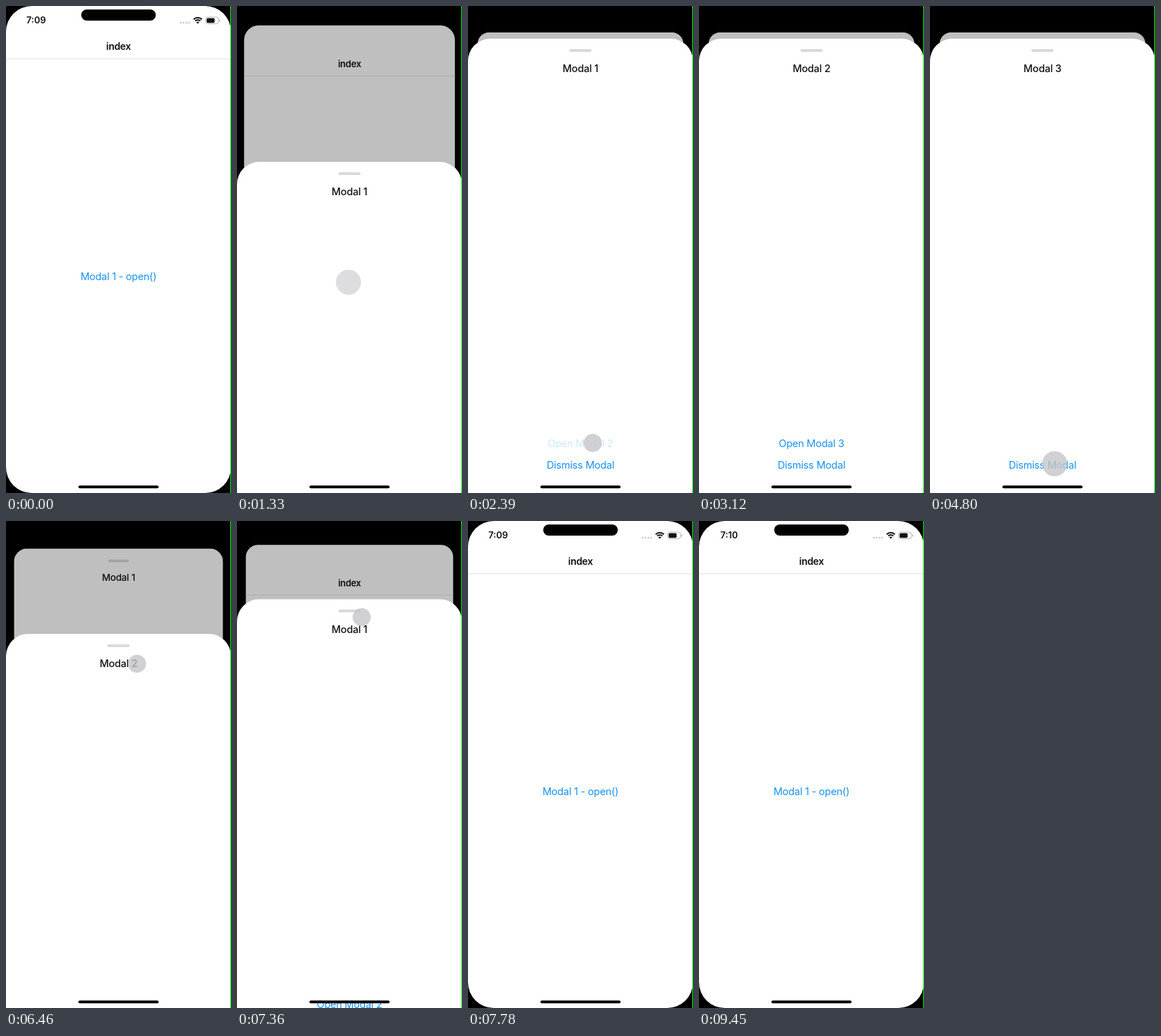
These frames come from a looping animation (323 px wide and 700 px high, 9610 ms). An HTML page with a canvas:

```html
<!DOCTYPE html>
<html lang="en">
<head>
<meta charset="utf-8">
<title>Stacked modals</title>
<style>
  html, body { margin: 0; width: 100%; height: 100%; overflow: hidden; background: #000; }
  canvas { display: block; width: 323px; height: 700px; }
</style>
</head>
<body>
<canvas id="stage"></canvas>
<script>
const W = 323, H = 700, LOOP = 9610, REST = 47, MID = 161.5;
const BLUE = '#1890f0';
const canvas = document.getElementById('stage');
const ctx = canvas.getContext('2d');
const ratio = window.devicePixelRatio || 1;
canvas.width = Math.round(W * ratio);
canvas.height = Math.round(H * ratio);

const clamp = x => Math.min(1, Math.max(0, x));
const lerp = (a, b, k) => a + (b - a) * k;
const phase = (t, start, length) => clamp((t - start) / length);

// Critically damped spring, normalised so that it ends at 1.
const settle = x => 1 - (1 + 6.5 * x) * Math.exp(-6.5 * x);
const spring = x => settle(x) / settle(1);

const sheets = [
  { open: 1120, drag: { start: 7150, length: 280, distance: 115 }, close: 7430, fall: 350 },
  { open: 2560, drag: { start: 5930, length: 600, distance: 147 }, close: 6530, fall: 350 },
  { open: 3860, close: 4870, fall: 600 }
];

const touches = [
  { x: 160, y: 397, down: 570, up: 950, fade: 680, link: 'Modal 1 - open()' },
  { x: 179, y: 628, down: 2050, up: 2390, fade: 680, link: 'Open Modal 2' },
  { x: 179, y: 628, down: 3320, up: 3690, fade: 680, link: 'Open Modal 3' },
  { x: 179, y: 658, down: 4630, up: 4700, fade: 680, link: 'Dismiss Modal' },
  { x: 188, y: 90, down: 5730, up: 6530, fade: 340, sheet: sheets[1] },
  { x: 179, y: 73, down: 7080, up: 7430, fade: 340, sheet: sheets[0] }
];

function dragOffset(sheet, t) {
  if (!sheet.drag) return 0;
  const { start, length, distance } = sheet.drag;
  return distance * phase(t, start, length) ** 2;
}

function sheetTop(sheet, t) {
  const opened = lerp(H, REST, spring(phase(t, sheet.open, 540)));
  return lerp(opened + dragOffset(sheet, t), H, spring(phase(t, sheet.close, sheet.fall)));
}

function linkAlpha(label, t) {
  const touch = touches.find(p => p.link === label && t >= p.down && t < p.up + 100);
  if (!touch) return 1;
  return 1 - 0.8 * phase(t, touch.down, 150) * (1 - phase(t, touch.up, 100));
}

function pill(x, y, w, h, color, radius = h / 2) {
  ctx.fillStyle = color;
  ctx.beginPath();
  ctx.roundRect(x, y, w, h, radius);
  ctx.fill();
}

function text(label, x, y, size, weight, color, spacing = '-0.2px') {
  ctx.font = `${weight} ${size}px Inter, sans-serif`;
  ctx.letterSpacing = spacing;
  ctx.textAlign = 'center';
  ctx.textBaseline = 'alphabetic';
  ctx.fillStyle = color;
  ctx.fillText(label, x, y + size * 0.36);
}

function link(label, y, t) {
  ctx.globalAlpha = linkAlpha(label, t);
  text(label, MID, y, 14.5, 400, BLUE);
  ctx.globalAlpha = 1;
}

function indexContent(t) {
  text('index', MID, 57.5, 14, 600, '#111', '-0.3px');
  ctx.fillStyle = '#e2e2e2';
  ctx.fillRect(0, 75.5, W, 1);
  link('Modal 1 - open()', 388.5, t);
}

function modalContent(number, t) {
  pill(145.5, 15, 32, 4, '#d9d9d9');
  text('Modal ' + number, MID, 43, 14.5, 500, '#111');
  if (number < 3) link('Open Modal ' + (number + 1), 582, t);
  link('Dismiss Modal', 613, t);
}

// covered: how far the next sheet is up; buried: the one after that.
function drawCard(level, top, covered, buried, t) {
  const scale = 1 - 0.086 * covered - 0.05 * buried;
  const y = lerp(top, 38, covered) + 5 * buried;
  const radius = lerp(level ? 32 : 37, 18, covered);
  const corners = level ? [radius, radius, 0, 0] : radius;
  ctx.save();
  ctx.translate(MID, y);
  ctx.scale(scale, scale);
  ctx.translate(-MID, 0);
  ctx.beginPath();
  ctx.roundRect(0, 0, W, level ? H + 20 : H, corners);
  ctx.clip();
  ctx.fillStyle = '#fff';
  ctx.fillRect(0, 0, W, H + 20);
  ctx.translate(0, 2.5 * covered);
  if (level) modalContent(level, t);
  else indexContent(t);
  ctx.translate(0, -2.5 * covered);
  const shade = 0.25 * clamp(covered / 0.73);
  ctx.fillStyle = `rgba(0,0,0,${lerp(shade, 1, buried)})`;
  ctx.fillRect(0, 0, W, H + 20);
  ctx.restore();
}

function statusBar(t, alpha) {
  ctx.globalAlpha = alpha;
  text(t < 9450 ? '7:09' : '7:10', 43.3, 20.8, 13, 600, '#111', '0px');
  for (let i = 0; i < 4; i++) pill(249.5 + i * 4, 22.8, 2.6, 2.6, '#c8c8c8');

  ctx.strokeStyle = '#111';
  ctx.lineWidth = 1.9;
  for (const r of [8.4, 5.2]) {
    ctx.beginPath();
    ctx.arc(275.3, 25.2, r, -Math.PI * 0.75, -Math.PI * 0.25);
    ctx.stroke();
  }
  ctx.fillStyle = '#111';
  ctx.beginPath();
  ctx.moveTo(275.3, 25.6);
  ctx.arc(275.3, 25.6, 3, -Math.PI * 0.75, -Math.PI * 0.25);
  ctx.fill();

  ctx.strokeStyle = '#b4b4b4';
  ctx.lineWidth = 1;
  ctx.beginPath();
  ctx.roundRect(286.5, 16, 18.5, 9.6, 3);
  ctx.stroke();
  pill(288, 17.4, 11.5, 6.8, '#111', 1.6);
  pill(306, 19.2, 1.3, 3.2, '#b4b4b4', 0.6);
  ctx.globalAlpha = 1;
}

function drawTouch(touch, t) {
  if (t < touch.down || t > touch.up + touch.fade) return;
  const appear = phase(t, touch.down, 120);
  const gone = phase(t, touch.up + touch.fade * 0.4, touch.fade * 0.6);
  const radius = 13 * lerp(0.6, 1, appear) + 5 * phase(t, touch.up, 100);
  const drag = touch.sheet ? dragOffset(touch.sheet, t) : 0;
  ctx.fillStyle = `rgba(197,197,200,${0.79 * appear * (1 - gone)})`;
  ctx.beginPath();
  ctx.arc(touch.x, touch.y + drag, radius, 0, Math.PI * 2);
  ctx.fill();
}

function draw(t) {
  ctx.setTransform(canvas.width / W, 0, 0, canvas.height / H, 0, 0);
  ctx.fillStyle = '#000';
  ctx.fillRect(0, 0, W, H);

  const tops = [0, ...sheets.map(sheet => sheetTop(sheet, t))];
  const raised = i => i < tops.length ? (H - tops[i]) / (H - REST) : 0;
  tops.forEach((top, i) => {
    if (top < H) drawCard(i, top, raised(i + 1), raised(i + 2), t);
    if (i === 0) statusBar(t, clamp(1 - raised(1) * 4));
  });

  touches.forEach(touch => drawTouch(touch, t));
  pill(108, 5, 107, 16, '#000');
  pill(104, 689.3, 115, 4, '#000');
  ctx.fillStyle = '#0f0';
  ctx.fillRect(322, 0, 1, H);
}

const began = performance.now();
function tick() {
  draw((performance.now() - began) % LOOP);
  requestAnimationFrame(tick);
}
tick();
</script>
</body>
</html>
```
